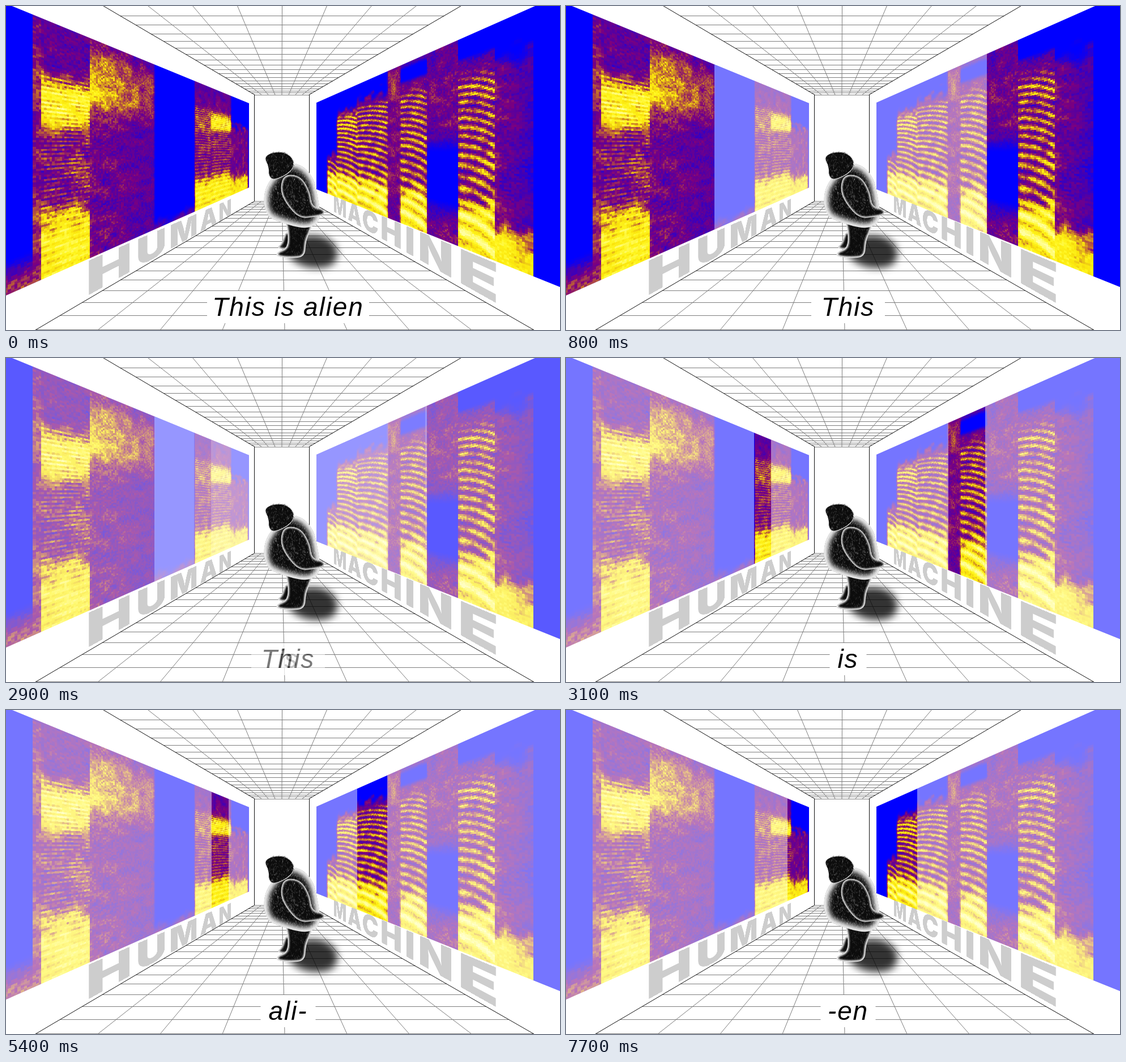
Animation of 978 by 573 pixels, one loop 8000 ms. Source, as an HTML page with a canvas:

```html
<!DOCTYPE html>
<html lang="en">
<head>
<meta charset="utf-8">
<title>This is alien</title>
<style>
html, body { margin: 0; width: 100%; height: 100%; overflow: hidden; background: #fff; }
canvas { display: block; width: 978px; height: 573px; }
</style>
</head>
<body>
<canvas id="stage" width="978" height="573"></canvas>
<script>
const W = 978, H = 573, LOOP = 8000;
const clamp = (v) => Math.max(0, Math.min(1, v));
const lerp = (a, b, f) => a + (b - a) * f;
const smooth = (a, b, t) => {
  const f = clamp((t - a) / (b - a));
  return f * f * (3 - 2 * f);
};

function layer(w = W, h = H) {
  const c = document.createElement('canvas');
  c.width = w;
  c.height = h;
  return c.getContext('2d');
}

function hash(a, b) {
  let h = Math.imul(a + 11, 374761393) + Math.imul(b + 7, 668265263);
  h = Math.imul(h ^ (h >>> 13), 1274126177);
  return ((h ^ (h >>> 16)) >>> 0) / 2 ** 32;
}

// Smooth value noise, -0.5 to 0.5
function cloud(x, y) {
  const i = Math.floor(x), j = Math.floor(y);
  const fx = smooth(0, 1, x - i), fy = smooth(0, 1, y - j);
  return lerp(
    lerp(hash(i, j), hash(i + 1, j), fx),
    lerp(hash(i, j + 1), hash(i + 1, j + 1), fx), fy) - 0.5;
}

// ---------- wall spectrograms ----------
// A sound runs from the end of the previous one to `to`. Heights: 0 ceiling, 1 floor.
// base: overall energy, top: where it sets in, peak/spread/gain: one loud or quiet band,
// pitch: harmonics, bass: where the low end begins, decay: loss towards its end
const QUIET = { base: 0, top: -1, peak: 0, spread: 0.1, gain: 0, pitch: 0, bass: 2, decay: 0 };
const NOISE = { ...QUIET, base: 0.36 };
const VOICE = { ...NOISE, pitch: 34, bass: 0.78 };

const walls = [
  {
    x0: 0, x1: 429, vp: 603, k: 60000, ring: 0.2, bend: 0.01,
    top: (x) => 172 - 0.411 * (429 - x),
    bottom: (x) => 321 + 0.445 * (429 - x),
    sounds: [
      { ...QUIET, to: 48, bass: 0.93 },
      { ...NOISE, to: 62, base: 0.46 },
      { ...VOICE, to: 148, pitch: 85, peak: 0.32, gain: 0.46 },
      { ...NOISE, to: 262, peak: 0.19, spread: 0.17, gain: 0.46, decay: 0.35 },
      { ...QUIET, to: 333, bass: 1 },
      { ...VOICE, to: 362, pitch: 70, peak: 0.3, gain: 0.15 },
      { ...VOICE, to: 397, pitch: 70, peak: 0.29, spread: 0.08, gain: 0.45 },
      { ...VOICE, to: 427, pitch: 0, top: 0.3, bass: 0.84 }
    ]
  },
  {
    x0: 548, x1: 978, vp: 367, k: 62000, ring: 0.4, bend: 0.05,
    top: (x) => 171 - 0.443 * (x - 548),
    bottom: (x) => 324 + 0.4023 * (x - 548),
    sounds: [
      { ...QUIET, to: 567 },
      { ...VOICE, to: 584, top: 0.6 },
      { ...VOICE, to: 620, top: 0.2, peak: 0.28, gain: 0.15 },
      { ...VOICE, to: 674, top: 0.13 },
      { ...NOISE, to: 696, peak: 0.08, gain: 0.2 },
      { ...VOICE, to: 743, peak: 0.07, spread: 0.05, gain: -0.35 },
      { ...NOISE, to: 798, peak: 0.67, spread: 0.2, gain: -0.42 },
      { ...VOICE, to: 863, peak: 0.04, spread: 0.07, gain: -0.42 },
      { ...VOICE, to: 930, pitch: 0, top: 0.15, bass: 0.86, decay: 0.55 }
    ]
  }
];

const ramp = [
  [0, 0, 0, 255], [0.2, 75, 0, 170], [0.4, 125, 0, 125],
  [0.62, 190, 100, 50], [0.8, 250, 228, 12], [0.92, 255, 246, 30], [1.1, 255, 255, 170]
];

function tint(v) {
  v = Math.max(0, Math.min(1.09, v));
  const i = ramp.findIndex((s) => s[0] > v);
  const a = ramp[i - 1], b = ramp[i], f = (v - a[0]) / (b[0] - a[0]);
  return [1, 2, 3].map((j) => lerp(a[j], b[j], f));
}

function energy(sound, s, v, wall, blot) {
  const onset = smooth(sound.top - 0.04, sound.top + 0.04, v + blot * 0.08);
  const offset = (v - sound.peak) / sound.spread;
  const band = sound.gain * Math.exp(-(offset ** 4)) * (1 - 0.5 * sound.decay * s);
  const low = smooth(sound.bass - 0.07, sound.bass + 0.07, v + blot * 0.04);
  let e = sound.base * onset * lerp(0.75, 1, smooth(0, 0.25, v)) + band + 0.48 * low;
  if (sound.pitch) {
    const h = v - wall.bend * s * s;
    const wave = Math.sin(2 * Math.PI * sound.pitch * h * (1 - 0.35 * h));
    const from = Math.max(0.15, sound.top);
    e += wall.ring * (0.35 + 0.6 * wave) * smooth(from, from + 0.08, v) * lerp(1, 0.6, low);
  }
  return e * (1 - sound.decay * s * (1 - low));
}

function level(wall, x, v, col, row, grain) {
  const blot = cloud(col / 5, row / 4);
  let from = wall.x0 - 20, sum = 0;
  for (const sound of wall.sounds) {
    const weight = clamp((x - from) / 3 + 0.5) * clamp((sound.to - x) / 3 + 0.5);
    if (weight) sum += weight * energy(sound, (x - from) / (sound.to - from), v, wall, blot);
    from = sound.to;
  }
  const rough = clamp(sum * 3) * (1 - 0.6 * smooth(0.7, 0.95, sum));
  return sum + ((hash(col, row) - 0.5) * 0.24 * grain + blot * 0.26) * rough;
}

function paintWall(img, wall) {
  const rows = 120, side = wall.x0 ? 1 : -1;
  for (let x = wall.x0; x < wall.x1; x++) {
    const dist = (x + 0.5 - wall.vp) * side;
    const col = Math.floor(wall.k / dist);
    const cx = wall.vp + side * wall.k / (col + 0.5);
    const grain = Math.min(1, 0.4 + 0.2 * dist * dist / wall.k);
    const top = wall.top(x + 0.5), high = wall.bottom(x + 0.5) - top;
    let last = null, rgb;
    for (let y = Math.max(0, Math.floor(top) - 1); y < Math.min(H, top + high + 2); y++) {
      const row = Math.floor((y + 0.5 - top) / high * rows);
      if (row !== last) {
        rgb = tint(level(wall, cx, (row + 0.5) / rows, col, row, grain));
        last = row;
      }
      img.data.set([...rgb, 255], (y * W + x) * 4);
    }
  }
}

function wallPath(ctx) {
  ctx.beginPath();
  for (const w of walls) {
    ctx.moveTo(w.x0, w.top(w.x0));
    ctx.lineTo(w.x1, w.top(w.x1));
    ctx.lineTo(w.x1, w.bottom(w.x1));
    ctx.lineTo(w.x0, w.bottom(w.x0));
    ctx.closePath();
  }
}

const spectra = layer();
const pixels = spectra.createImageData(W, H);
walls.forEach((w) => paintWall(pixels, w));
spectra.putImageData(pixels, 0, 0);

// ---------- slides ----------
const slides = [
  { text: 'This is alien', box: 286, left: [0, 429], right: [548, 978] },
  { text: 'This', box: 130, left: [0, 262], right: [743, 978] },
  { text: 'is', box: 65, left: [332, 362], right: [675, 740] },
  { text: 'ali-', box: 97, left: [363, 393], right: [620, 673] },
  { text: '-en', box: 97, left: [391, 429], right: [548, 620] }
].map(drawSlide);

function drawSlide({ text, box, left, right }) {
  const ctx = layer();
  ctx.save();
  wallPath(ctx);
  ctx.clip();
  ctx.drawImage(spectra.canvas, 0, 0);
  ctx.fillStyle = 'rgba(255,255,255,0.46)';
  [[0, left[0]], [left[1], 429], [548, right[0]], [right[1], W]]
    .forEach(([a, b]) => ctx.fillRect(a, 0, b - a, H));
  ctx.restore();

  ctx.fillStyle = '#fff';
  ctx.fillRect(498 - box / 2, 504, box, 57);
  ctx.fillStyle = '#000';
  ctx.font = 'italic 46px "Liberation Sans", sans-serif';
  ctx.letterSpacing = '1.9px';
  ctx.fillText(text, 498 - ctx.measureText(text).width / 2, 548);
  return ctx.canvas;
}

// ---------- room ----------
function line(ctx, x0, y0, x1, y1, color, width = 1) {
  ctx.strokeStyle = color;
  ctx.lineWidth = width;
  ctx.beginPath();
  ctx.moveTo(x0, y0);
  ctx.lineTo(x1, y1);
  ctx.stroke();
}

// Rows spread from the back wall by a constant ratio
function grid(ctx, yBack, yNear, xl, xr) {
  const grey = '#7d7d7d', dir = Math.sign(yNear - yBack), depth = Math.abs(yNear - yBack);
  for (let n = 0, d = 0; d < depth; n++, d = 28 * ((10 / 9) ** n - 1)) {
    const y = Math.floor(yBack + dir * d) + 0.5, f = d / depth;
    line(ctx, lerp(439, xl, f), y, lerp(535, xr, f), y, grey);
  }
  for (let i = 0; i <= 8; i++) {
    line(ctx, 439 + 12 * i, yBack, lerp(xl, xr, i / 8), yNear, i % 8 ? grey : '#111');
  }
}

// Upright text on a receding wall, drawn column by column
function wallWord(ctx, text, x0, top0, bot0, x1, top1, bot1) {
  const ink = layer();
  const setFont = () => {
    ink.font = '900 200px Inter, "Liberation Sans", sans-serif';
    ink.letterSpacing = '16px';
    ink.fillStyle = '#cdcdcd';
  };
  setFont();
  const m = ink.measureText(text);
  const cap = Math.ceil(ink.measureText('H').actualBoundingBoxAscent);
  const wide = Math.ceil(m.actualBoundingBoxLeft + m.actualBoundingBoxRight);
  ink.canvas.width = wide;
  ink.canvas.height = cap;
  setFont();
  ink.fillText(text, m.actualBoundingBoxLeft, cap);

  const h0 = bot0 - top0, h1 = bot1 - top1, span = x1 - x0;
  const source = (s) => wide * s * h1 / (s * h1 + (1 - s) * h0);
  for (let i = 0; i < span; i++) {
    const s = i / span, a = source(s), b = source((i + 1) / span);
    ctx.drawImage(ink.canvas, a, 0, b - a, cap, x0 + i, lerp(top0, top1, s), 1, lerp(h0, h1, s));
  }
}

// ---------- figure ----------
function blob(pts) {
  const p = new Path2D(), n = pts.length;
  const mid = (a, b) => [(a[0] + b[0]) / 2, (a[1] + b[1]) / 2];
  p.moveTo(...mid(pts[n - 1], pts[0]));
  pts.forEach((q, i) => p.quadraticCurveTo(...q, ...mid(q, pts[(i + 1) % n])));
  p.closePath();
  return p;
}

// Dark furry shape with light falling on its rim
function part(ctx, pts, rim, light, seed) {
  const path = blob(pts);
  const xs = pts.map((p) => p[0]), ys = pts.map((p) => p[1]);
  const x0 = Math.min(...xs), y0 = Math.min(...ys);
  const w = Math.max(...xs) - x0, h = Math.max(...ys) - y0;
  ctx.save();
  ctx.clip(path);
  ctx.fillStyle = '#0c0c0c';
  ctx.fill(path);
  for (let i = 0; i < w * h / 9; i++) {
    const x = x0 + w * hash(i, seed), y = y0 + h * hash(i, seed + 1);
    const turn = 0.8 + 1.4 * hash(i, seed + 2);
    line(ctx, x, y, x + 3 * Math.cos(turn), y + 3 * Math.sin(turn),
      `rgba(255,255,255,${light * hash(i, seed + 3)})`, 0.8);
  }
  ctx.filter = `blur(${rim / 3}px)`;
  ctx.strokeStyle = '#fff';
  ctx.lineWidth = rim;
  ctx.stroke(path);
  ctx.restore();
}

function figure(ctx) {
  ctx.save();
  ctx.filter = 'blur(7px)';
  ctx.fillStyle = 'rgba(0,0,0,0.8)';
  ctx.fill(blob([[490, 436], [510, 408], [560, 404], [588, 428], [580, 462], [525, 464]]));
  ctx.restore();

  // far foot, near leg, torso, arm, head
  part(ctx, [[493, 398], [488, 420], [476, 428], [500, 432], [504, 404]], 4, 0.2, 20);
  part(ctx, [
    [490, 370], [498, 400], [497, 428], [480, 434], [476, 443], [502, 446],
    [528, 444], [529, 415], [542, 388], [535, 366]
  ], 5, 0.2, 30);
  part(ctx, [
    [476, 296], [459, 318], [454, 345], [461, 373], [488, 384], [525, 394], [548, 388],
    [556, 370], [550, 335], [544, 306], [526, 283], [500, 276]
  ], 15, 0.35, 40);
  part(ctx, [
    [488, 302], [484, 328], [496, 352], [518, 376], [546, 373], [563, 369],
    [562, 359], [540, 355], [537, 330], [524, 305], [505, 297]
  ], 4, 0.35, 50);
  part(ctx, [
    [455, 268], [467, 259], [488, 257], [507, 267], [509, 286],
    [494, 300], [471, 309], [463, 300], [463, 284]
  ], 2, 0.3, 60);

  for (let i = 0; i < 90; i++) {
    const a = -2.7 + 3.2 * hash(i, 70), r = 0.88 + 0.16 * hash(i, 71);
    const x = 482 + 24 * r * Math.cos(a), y = 281 + 22 * r * Math.sin(a);
    line(ctx, x, y, x + 3 * Math.cos(a + 0.8), y + 3 * Math.sin(a + 0.8), 'rgba(20,20,20,0.5)', 0.7);
  }
}

const room = layer();
room.fillStyle = '#fff';
room.fillRect(0, 0, W, H);
grid(room, 157, 0, 172, 803);
grid(room, 345, 573, 52, 932);
line(room, 438.5, 157, 438.5, 345, '#111');
line(room, 535.5, 157, 535.5, 345, '#111');
wallWord(room, 'HUMAN', 146, 450, 511, 397, 341, 369);
wallWord(room, 'MACHINE', 579, 336, 364, 866, 456, 526);
figure(room);

// ---------- playback ----------
const stage = document.getElementById('stage').getContext('2d');
const firstCue = 500, gap = 2300, stepTime = 100;

function show(slide, alpha) {
  stage.globalAlpha = alpha;
  stage.drawImage(slide, 0, 0);
  stage.globalAlpha = 1;
}

function render(t) {
  const since = t - firstCue;
  const i = Math.floor(since / gap) + 1;
  const step = Math.floor((since - (i - 1) * gap) / stepTime);
  const mix = i ? Math.min(1, 0.2 + 0.28 * step) : 1;
  stage.drawImage(room.canvas, 0, 0);
  show(slides[i], mix);
  if (mix < 1) show(slides[i - 1], 1 - mix);
}

const start = performance.now();
function tick() {
  render((performance.now() - start) % LOOP);
  requestAnimationFrame(tick);
}
tick();
</script>
</body>
</html>
```
